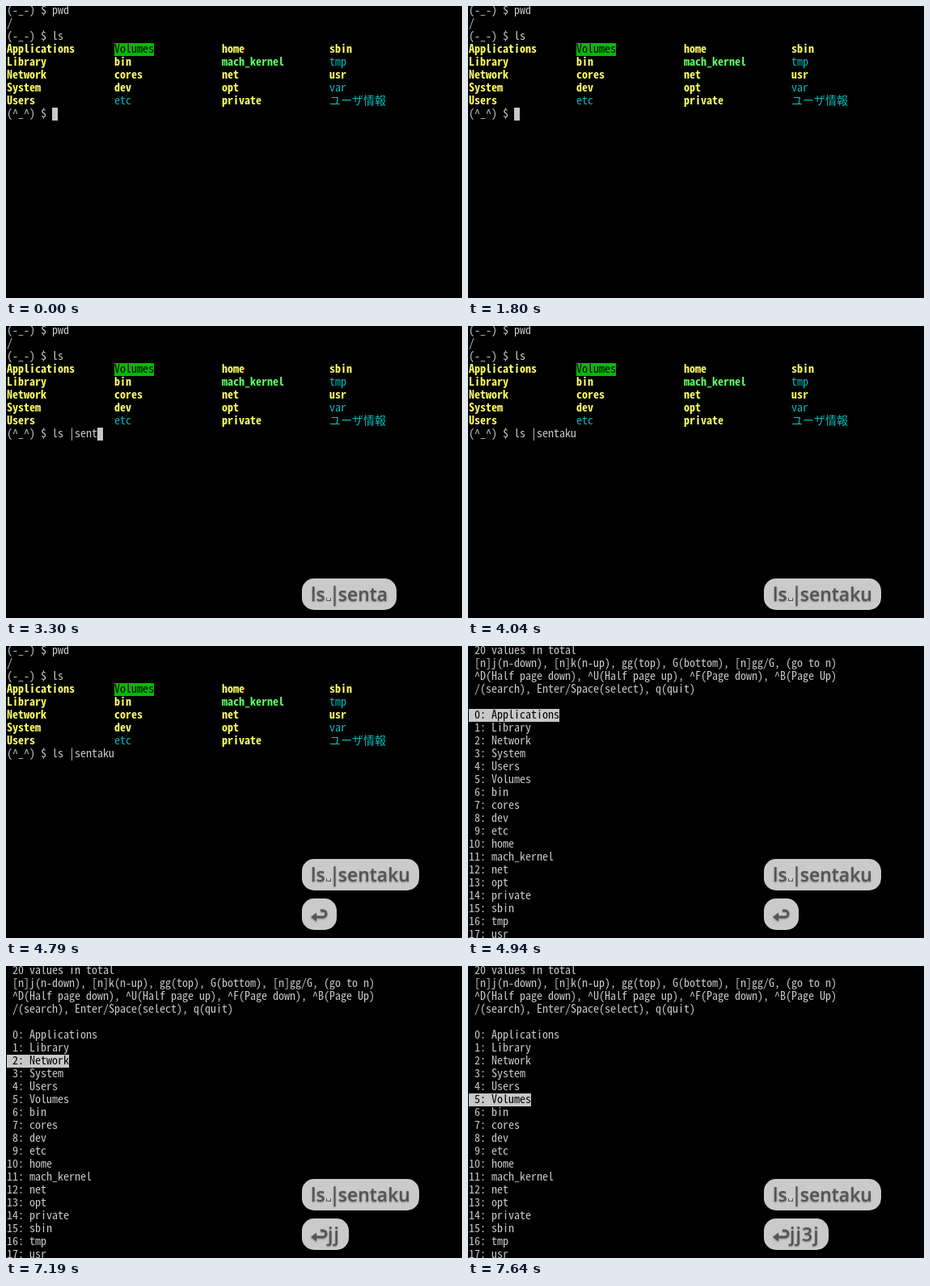
Animation of 564 by 362 pixels, one loop 8000 ms. Source, as an HTML page:

```html
<!DOCTYPE html>
<html lang="ja">
<head>
<meta charset="utf-8">
<style>
  html, body { margin: 0; width: 100%; height: 100%; overflow: hidden; background: #000; }
  #term { position: absolute; inset: 0; overflow: hidden; }
  pre {
    position: absolute; left: 1px; top: -4px; margin: 0; color: #c8c8c8;
    font: 14px/16px "Noto Sans Mono CJK JP", "Noto Sans CJK JP", monospace;
  }
  .box { position: absolute; height: 16px; background: #c8c8c8; }
  .dir { color: #ffff60; font-weight: bold; }
  .exe { color: #5fff66; font-weight: bold; }
  .link { color: #00bbbb; }
  .inv { color: #000; }
  #keys {
    position: absolute; left: 366px; top: 264px; height: 88px;
    display: flex; flex-direction: column; justify-content: flex-end; align-items: flex-start; gap: 10px;
  }
  #keys div {
    height: 39px; padding: 0 11px; border-radius: 15px; background: #cacaca; color: #555;
    font: 600 23px/39px "Open Sans", sans-serif; white-space: nowrap;
    text-shadow: 0 1px 2px rgba(0, 0, 0, .4);
  }
  #keys div + div { letter-spacing: 1.1px; }
  #keys i {
    display: inline-block; box-sizing: border-box; width: 6px; height: 4px; margin: 0 1px;
    border: solid #555; border-width: 0 1.5px 1.5px;
  }
  #keys b { font: 24px/1 "DejaVu Sans", sans-serif; }
  svg { vertical-align: -1px; filter: drop-shadow(0 1px 1px rgba(0, 0, 0, .35)); }
</style>
</head>
<body>
<div id="term"></div>
<div id="keys"></div>
<script>
const LOOP = 8000, COL = 7, ROW = 16;
const term = document.getElementById('term'), keys = document.getElementById('keys');

const names = ('Applications Library Network System Users Volumes bin cores dev etc ' +
  'home mach_kernel net opt private sbin tmp usr var ユーザ情報').split(' ');
const kinds = { Volumes: 'inv', mach_kernel: 'exe', etc: 'link', tmp: 'link', var: 'link', 'ユーザ情報': 'link' };
const help = [
  ' 20 values in total',
  ' [n]j(n-down), [n]k(n-up), gg(top), G(bottom), [n]gg/G, (go to n)',
  ' ^D(Half page down), ^U(Half page up), ^F(Page down), ^B(Page Up)',
  ' /(search), Enter/Space(select), q(quit)',
  ''
];

// start time, typed command, cursor shown, key lines, selected row
const steps = [
  [0, '', 1, []],
  [750, '', 0, []],
  [1800, '', 1, []],
  [2100, 'l', 1, ['l']],
  [2250, 'ls ', 1, ['ls ']],
  [2550, 'ls |', 1, ['ls |']],
  [3000, 'ls |s', 1, ['ls |s']],
  [3150, 'ls |se', 1, ['ls |sen']],
  [3300, 'ls |sent', 1, ['ls |senta']],
  [3450, 'ls |sentak', 1, ['ls |sentaku']],
  [3600, 'ls |sentaku', 1, ['ls |sentaku']],
  [4040, 'ls |sentaku', 0, ['ls |sentaku']],
  [4790, 'ls |sentaku', 0, ['ls |sentaku', '↩']],
  [4940, '', 0, ['ls |sentaku', '↩'], 0],
  [6890, '', 0, ['ls |sentaku', '↩j'], 1],
  [7190, '', 0, ['ls |sentaku', '↩jj'], 2],
  [7490, '', 0, ['ls |sentaku', '↩jj3j'], 2],
  [7640, '', 0, ['ls |sentaku', '↩jj3j'], 5]
];

const enter = `<svg width="21" height="16" fill="none" stroke="#555" stroke-width="3">
  <path d="M5 10H15a4 4 0 0 0 0-8H12"/><path d="M0 10L7 4.5V15.5z" fill="#555" stroke="none"/></svg>`;
const glyphs = { ' ': '<i></i>', '|': '<b>|</b>', '↩': enter };

const span = (cls, text) => `<span class="${cls}">${text}</span>`;
const box = (col, row, cols, color = '') =>
  `<div class="box" style="left:${1 + col * COL}px;top:${row * ROW - 2}px;width:${cols * COL}px;background:${color}"></div>`;
const page = lines => `<pre>${lines.join('\n')}</pre>`;

function shell(typed, cursor) {
  const rows = [0, 1, 2, 3, 4].map(r => [0, 1, 2, 3].map(c => {
    const name = names[c * 5 + r];
    return span(kinds[name] || 'dir', name) + ' '.repeat(19 - name.length);
  }).join(''));
  return box(19, 3, 7, '#00bb00') + (cursor ? box(8 + typed.length, 8, 1) : '') +
    page(['(-_-) $ pwd', '/', '(-_-) $ ls', ...rows, '(^_^) $ ' + typed]);
}

function menu(selected) {
  const items = names.slice(0, 18).map((name, i) => String(i).padStart(2) + ': ' + name);
  const width = items[selected].length;
  items[selected] = span('inv', items[selected]);
  return box(0, 5 + selected, width) + page([...help, ...items]);
}

let shown;
function draw(now) {
  const t = now % LOOP;
  const step = steps.findLast(s => s[0] <= t);
  if (step !== shown) {
    shown = step;
    const [, typed, cursor, lines, selected] = step;
    term.innerHTML = selected === undefined ? shell(typed, cursor) : menu(selected);
    keys.innerHTML = lines.map(s => `<div>${s.replace(/[ |↩]/g, c => glyphs[c])}</div>`).join('');
  }
}

const start = performance.now();
function tick() {
  draw(performance.now() - start);
  requestAnimationFrame(tick);
}
tick();
</script>
</body>
</html>
```
